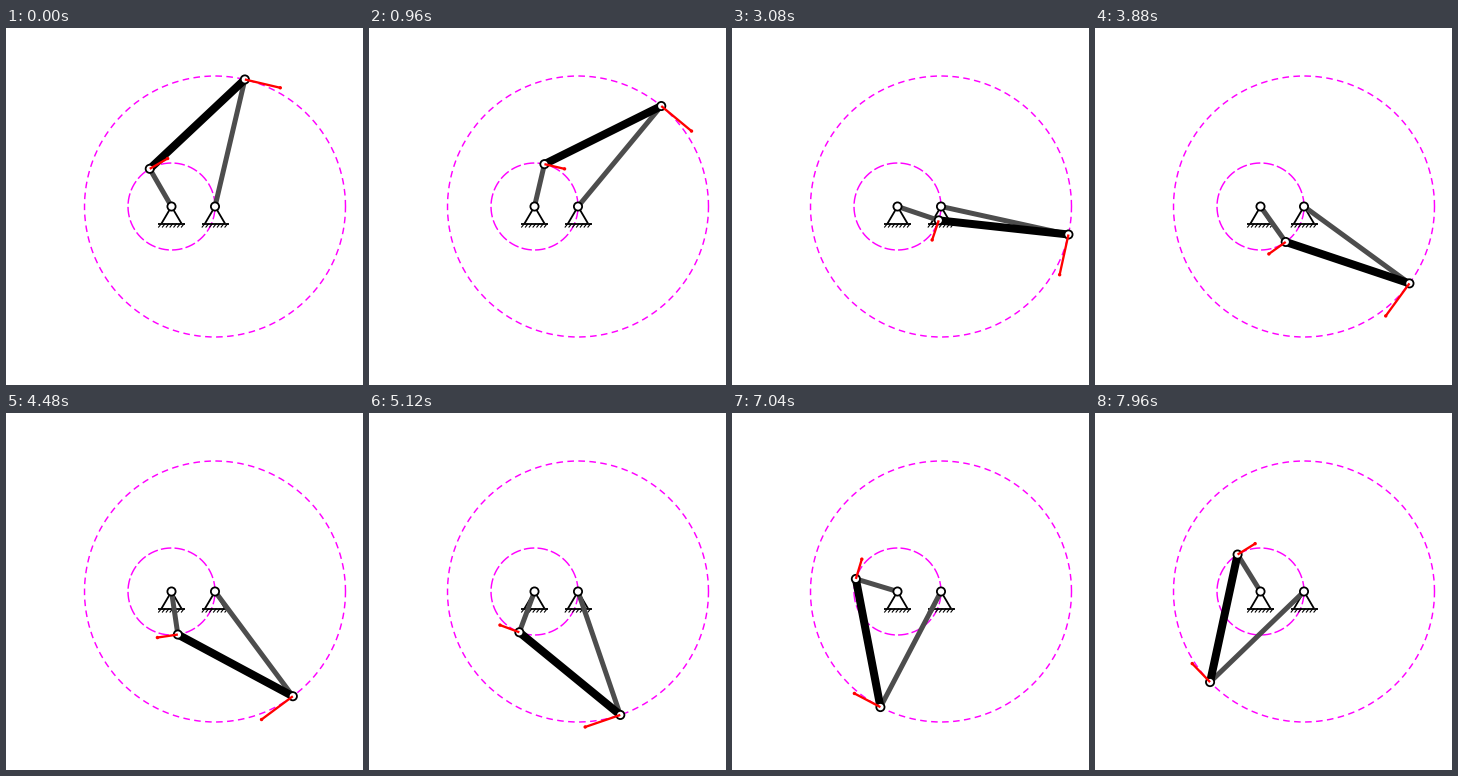
Recreate the animation shown at these times as a matplotlib script. Size 357 px wide and 357 px high, loop 8 s.

```python
import numpy as np
import matplotlib.pyplot as plt
from matplotlib.animation import FuncAnimation
from matplotlib.patches import Circle

SIZE, DPI = 357, 100
PX = 72 / DPI
FRAMES, STEP_MS = 200, 40

UNIT = 43.5
LONG = 3 * UNIT
A = np.array([165.5, 178.5])
B = A + [UNIT, 0]
SPEED = 0.475          # arrow length per unit of joint speed

fig = plt.figure(figsize=(SIZE / DPI, SIZE / DPI), dpi=DPI, facecolor="white")
ax = fig.add_axes([0, 0, 1, 1])
ax.set_xlim(0, SIZE)
ax.set_ylim(SIZE, 0)
ax.axis("off")


def line(points, color, width, z, **kw):
    xs, ys = np.transpose(points)
    kw.setdefault("solid_capstyle", "butt")
    return ax.plot(xs, ys, color=color, lw=width * PX, zorder=z, **kw)[0]


def orbit(center, radius, dash, gap):
    t = np.linspace(0, 2 * np.pi, 400)
    pts = np.column_stack([center[0] + radius * np.cos(t),
                           center[1] - radius * np.sin(t)])
    width = 1.45
    line(pts, "#ff00ff", width, 1, dashes=(dash / width, gap / width),
         dash_capstyle="butt")


def support(p):
    x, y = p
    base = y + 17
    line([(x - 10, base), (x, y), (x + 10, base)], "black", 1.8, 2)
    line([(x - 13.5, base), (x + 13.5, base)], "black", 1.8, 2)
    for i in range(7):
        right = x - 10 + 3.8 * i
        line([(right, base), (right - 3.2, base + 4)], "black", 1.1, 2)


def joint(p):
    return ax.add_patch(Circle(p, 4.1, fc="white", ec="black",
                               lw=1.8 * PX, zorder=5))


def arrow():
    shaft = line([A, A], "red", 2.3, 6)
    tip = ax.add_patch(Circle(A, 1.7, fc="red", ec="none", zorder=6))
    return shaft, tip


def heading(angle):
    return np.array([np.cos(angle), -np.sin(angle)])


def clockwise(angle):
    return np.array([np.sin(angle), np.cos(angle)])


orbit(B, LONG, 6.6, 4.4)
orbit(A, UNIT, 10.5, 3.2)
for pivot in (A, B):
    support(pivot)
    joint(pivot)

crank = line([A, A], "#4d4d4d", 5, 3)
rocker = line([B, B], "#4d4d4d", 5, 3)
coupler = line([A, B], "black", 8, 4)
joints = [joint(A), joint(B)]
arrows = [arrow(), arrow()]


def set_line(artist, p, q):
    artist.set_data([p[0], q[0]], [p[1], q[1]])


def draw(i):
    theta = np.radians(120 - 360 * i / FRAMES)
    half = theta / 2
    ratio = UNIT / LONG
    # The four bars form a kite, so the rocker angle has a closed form.
    phi = half + np.arcsin(ratio * np.sin(half))
    rate = 0.5 * (1 + ratio * np.cos(half)
                  / np.sqrt(1 - (ratio * np.sin(half)) ** 2))

    p = A + UNIT * heading(theta)
    q = B + LONG * heading(phi)
    set_line(crank, A, p)
    set_line(rocker, B, q)
    set_line(coupler, p, q)

    speeds = (UNIT * clockwise(theta), LONG * rate * clockwise(phi))
    for pos, vel, dot, (shaft, tip) in zip((p, q), speeds, joints, arrows):
        end = pos + SPEED * vel
        dot.center = pos
        set_line(shaft, pos, end)
        tip.center = end
    return [crank, rocker, coupler, *joints, *(a for pair in arrows for a in pair)]


anim = FuncAnimation(fig, draw, frames=FRAMES, interval=STEP_MS,
                     repeat=True, repeat_delay=0, blit=False)
plt.show()
```
